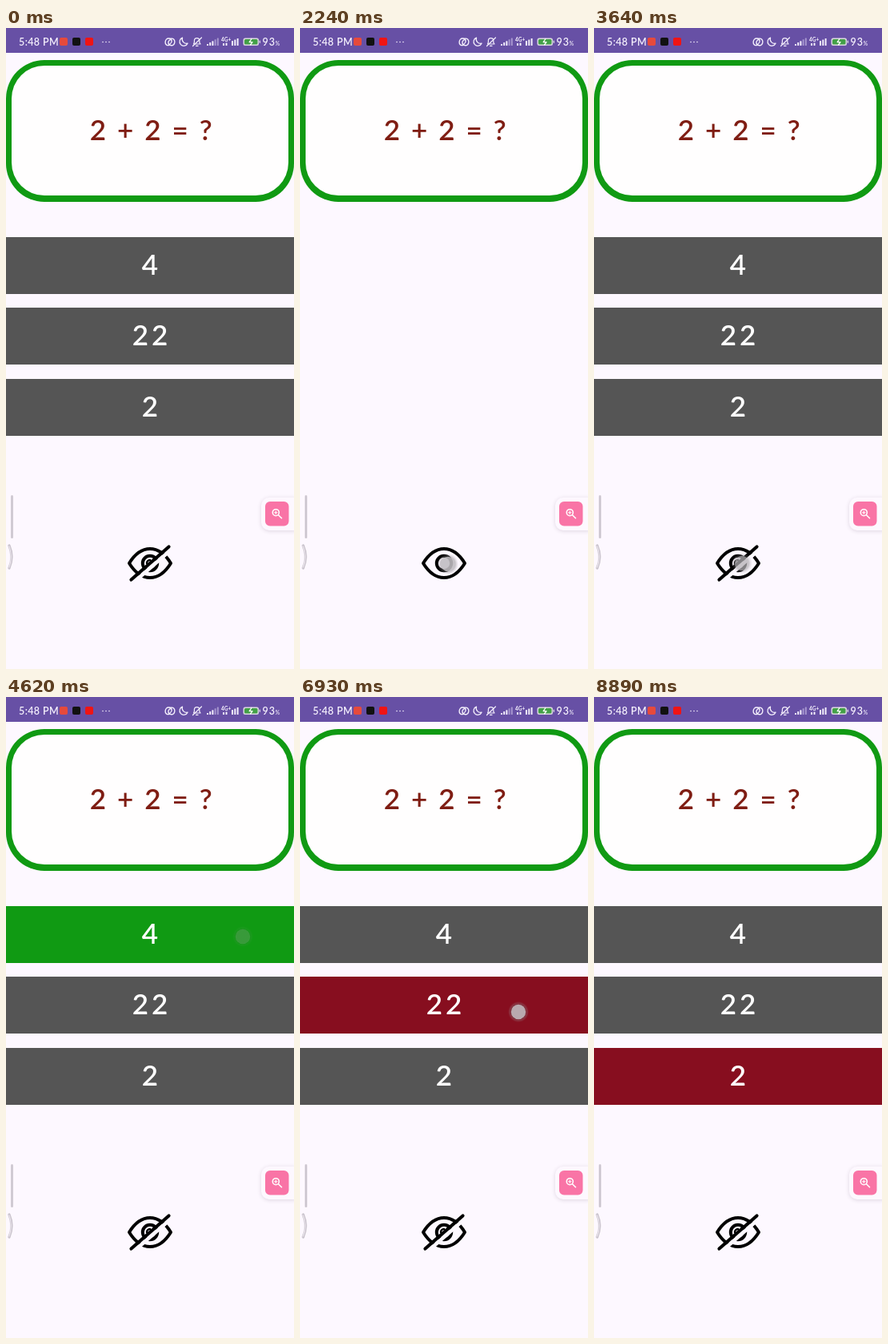
Animation of 360x800 px, one loop 9170 ms. Source, as an HTML page with a canvas:

```html
<!DOCTYPE html>
<html lang="en">
<head>
<meta charset="utf-8">
<title>Quiz</title>
<style>
html, body { margin: 0; width: 100%; height: 100%; overflow: hidden; background: #fdf8ff; }
canvas { display: block; width: 360px; height: 800px; }
</style>
</head>
<body>
<canvas id="stage"></canvas>
<script>
const LOOP = 9170, STEP = 70;
const BG = '#fdf8ff', GREEN = '#109a13', RED = '#870e1f', GREY = '#555555', WHITE = '#ffffff';
const FONT = 'Lato, "Open Sans", sans-serif';

// Each tap: position, finger down, finger up, and what it triggers.
const taps = [
  { x: 182, y: 668, down: 1260, up: 1400, hits: 'eye' },
  { x: 185, y: 669, down: 2170, up: 2310, hits: 'eye' },
  { x: 181, y: 667, down: 3010, up: 3220, hits: 'eye' },
  { x: 185, y: 668, down: 3430, up: 3570, hits: 'eye' },
  { x: 296, y: 299, down: 4270, up: 4410, hits: 0 },
  { x: 284, y: 391, down: 4970, up: 5110, hits: 1 },
  { x: 298, y: 298, down: 5670, up: 5810, hits: 0 },
  { x: 273, y: 393, down: 6790, up: 6930, hits: 1 },
  { x: 276, y: 476, down: 7420, up: 7630, hits: 2 }
];
const answers = [
  { label: '4', y: 261, color: GREEN },
  { label: '22', y: 349, color: RED },
  { label: '2', y: 438, color: RED }
];

const canvas = document.getElementById('stage');
const ctx = canvas.getContext('2d');
const ratio = window.devicePixelRatio || 1;
canvas.width = 360 * ratio;
canvas.height = 800 * ratio;
ctx.scale(ratio, ratio);
ctx.lineCap = ctx.lineJoin = 'round';

function box(x, y, w, h, r, color) {
  ctx.fillStyle = color;
  ctx.beginPath();
  ctx.roundRect(x, y, w, h, r);
  ctx.fill();
}

function disc(x, y, r, color) {
  ctx.fillStyle = color;
  ctx.beginPath();
  ctx.arc(x, y, r, 0, Math.PI * 2);
  ctx.fill();
}

function stroke(path, color, width) {
  ctx.strokeStyle = color;
  ctx.lineWidth = width;
  ctx.stroke(new Path2D(path));
}

function text(str, x, y, size, color, spacing = 0, align = 'left', weight = 600) {
  ctx.font = `${weight} ${size}px ${FONT}`;
  ctx.letterSpacing = spacing + 'px';
  ctx.textAlign = align;
  ctx.fillStyle = color;
  ctx.fillText(str, x, y);
}

function bars(x, step, full) {
  for (let i = 0; i < 5; i++) {
    const h = 2 + i * 1.9;
    box(x + i * step, 22 - h, 2, h, 0.5, i < full ? '#f4effc' : '#a797cf');
  }
}

function statusBar() {
  const ink = '#f4effc';
  box(0, 0, 360, 31, 0, '#6750a5');
  text('5:48 PM', 16, 21.5, 12.5, ink, 0.4);
  box(67, 12, 10, 10, 2, '#e64a3c');
  box(83, 12, 10, 10, 2, '#111111');
  box(99, 12, 10, 10, 2, '#f01414');
  [121, 125, 129].forEach(x => disc(x, 17.5, 0.8, ink));

  // Link, moon, muted bell
  stroke('M204 21.5 C197 23 198 12 204 13 C208 14 208 18 205 20', ink, 1.4);
  stroke('M206 13.2 C213 12 212 23 206 21.7 C202 20.5 202 16.5 205 14.8', ink, 1.4);
  stroke('M220.5 12.2 A5.2 5.2 0 1 0 227 19.2 A5.5 5.5 0 0 1 220.5 12.2 Z', ink, 1.3);
  stroke('M234.5 20 H243 L241.8 18 V15.8 A3.2 3.2 0 0 0 235.4 15.8 V18 Z M237.5 22.3 H240', ink, 1.2);
  stroke('M233.5 22.5 L244.5 12', ink, 1.2);

  bars(251, 3.2, 3);
  text('4G+', 269, 17, 6.5, ink, 0, 'left', 700);
  box(271, 19, 2, 3, 0.5, ink);
  box(274.5, 18.5, 2, 3.5, 0.5, ink);
  [6, 7.5, 9].forEach((h, i) => box(282 + i * 3.3, 22 - h, 2, h, 0.5, ink));

  box(296.5, 12.5, 19.5, 9.5, 2.5, '#d9d5df');
  box(298, 14, 16.5, 6.5, 1.5, '#43a047');
  box(316.6, 15.5, 1.4, 3.5, 0.7, '#d9d5df');
  stroke('M307 13.5 L304.2 17.6 H308 L305.5 21', WHITE, 1.3);
  text('93', 320.5, 21.5, 12.5, ink, 0.9);
  text('%', 336.5, 21.5, 7, ink);
}

function card() {
  box(0, 40, 360, 177, 48, GREEN);
  box(7, 47, 346, 162, 41, '#fffefe');
  text('2 + 2 = ?', 104.8, 139.5, 35, '#7f1d13', 2.6);
}

function edgeTools() {
  box(6, 583, 3, 54, 1.5, '#d0cad3');
  stroke('M4 646 Q10 660 4 674', '#c9c3cc', 3.2);
  stroke('M4 647 Q9 660 4 673', '#e8e2ea', 1.4);

  ctx.save();
  ctx.shadowColor = 'rgba(60, 40, 70, 0.16)';
  ctx.shadowBlur = 5 * ratio;
  ctx.shadowOffsetY = ratio;
  box(319, 586, 50, 41, 10, BG);
  ctx.restore();
  box(324, 591, 29.5, 30.5, 6, '#f974a6');
  stroke('M341.3 604.7 A4 4 0 1 1 333.3 604.7 A4 4 0 1 1 341.3 604.7 M340.4 607.7 L344.5 611.7', WHITE, 1.6);
  stroke('M335.6 604.7 H339 M337.3 603 V606.4', WHITE, 1.1);
}

function eye(open) {
  stroke('M154 668 C162 655 171 650 180 650 C189 650 198 655 206 668 C198 681 189 686 180 686 C171 686 162 681 154 668 Z', '#000', 4);
  stroke('M189.2 668 A9.2 9.2 0 1 1 170.8 668 A9.2 9.2 0 1 1 189.2 668', '#000', 4);
  if (open) return;
  stroke('M176 668 A4 4 0 0 1 180 664', '#000', 2.5);
  stroke('M160 691.5 L207 650.5', BG, 4.6);
  stroke('M156.5 688.5 L203.5 647.5', '#000', 4.2);
}

function touch(tap, t) {
  const alpha = Math.min((t - tap.down + STEP) / 140, 1 - (t - tap.up) / 280, 1);
  if (t < tap.down || alpha <= 0) return;
  ctx.save();
  ctx.globalAlpha = alpha;
  const halo = ctx.createRadialGradient(tap.x, tap.y, 8, tap.x, tap.y, 13);
  halo.addColorStop(0, 'rgba(40, 40, 40, 0.4)');
  halo.addColorStop(0.5, 'rgba(150, 145, 150, 0.3)');
  halo.addColorStop(1, 'rgba(150, 145, 150, 0)');
  disc(tap.x, tap.y, 13, halo);
  disc(tap.x, tap.y, 9.2, 'rgba(205, 201, 206, 0.82)');
  ctx.restore();
}

function stateAt(t) {
  let open = false, chosen = -1;
  for (const tap of taps) {
    if (t < tap.up) break;
    if (tap.hits === 'eye') open = !open;
    else chosen = tap.hits;
  }
  return { open, chosen };
}

function draw(t) {
  const { open, chosen } = stateAt(t);
  box(0, 0, 360, 800, 0, BG);
  statusBar();
  card();
  if (!open) answers.forEach((a, i) => {
    box(0, a.y, 360, 71, 0, i === chosen ? a.color : GREY);
    text(a.label, 182, a.y + 46.5, 35, WHITE, 4, 'center');
  });
  edgeTools();
  eye(open);
  taps.forEach(tap => touch(tap, t));
}

const start = performance.now();
function tick() {
  const t = (performance.now() - start) % LOOP;
  draw(Math.floor(t / STEP) * STEP);
  requestAnimationFrame(tick);
}
tick();
</script>
</body>
</html>
```
